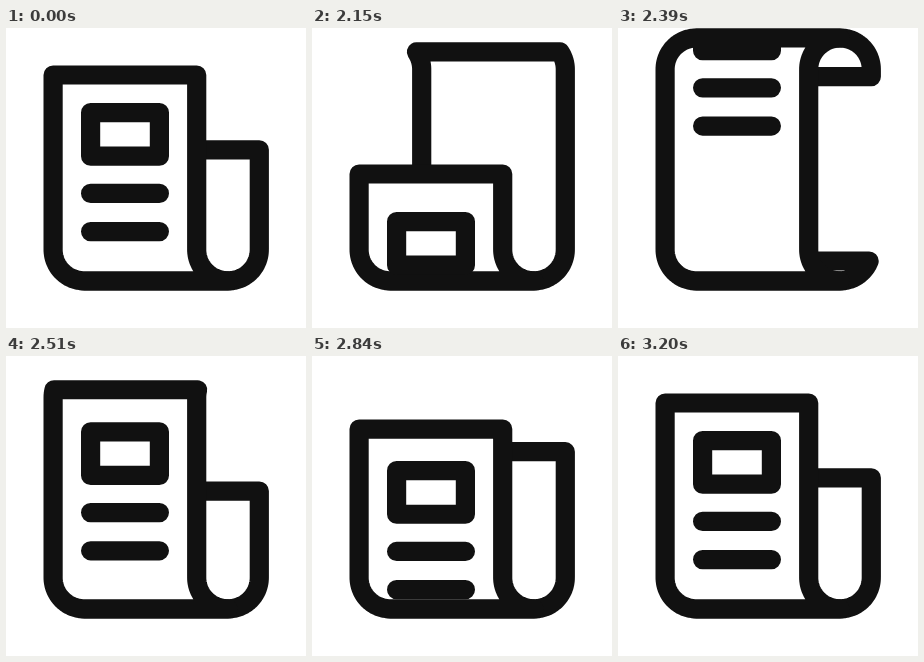
Write an HTML page with a canvas that moves like this. It is 300 px wide and 300 px high and loops after 3230 ms.

```html
<!DOCTYPE html>
<html lang="en">
<head>
<meta charset="utf-8">
<title>Rolling newspaper</title>
<style>
  html, body { margin: 0; width: 100%; height: 100%; overflow: hidden; background: #fff; }
  canvas { display: block; width: 300px; height: 300px; }
</style>
</head>
<body>
<canvas id="stage"></canvas>
<script>
const LOOP = 3230, START = 2030, STEP = 30;
const INK = '#111', PAPER = '#fff';

// The sheet is a strip running around an upright belt, seen slightly from the side.
const R = 31.3, TOP = 41.3, BOTTOM = 221.6, LEFT = 78.4, RIGHT = 222;
const ARC = R * Math.PI / 2, SIDE = BOTTOM - TOP;
const HALF = SIDE + 2 * ARC, BELT = 2 * HALF;
const TAIL = ARC + 47 - TOP;                          // resting upper edge of the front
const SHEET = HALF + ARC + BOTTOM - 121.8 - TAIL;     // sheet length

const canvas = document.getElementById('stage');
const ctx = canvas.getContext('2d');
const dpr = window.devicePixelRatio || 1;
canvas.width = canvas.height = 300 * dpr;
ctx.scale(dpr, dpr);
ctx.lineWidth = 19.2;
ctx.lineCap = ctx.lineJoin = 'round';
ctx.strokeStyle = INK;
ctx.fillStyle = PAPER;

// cubic-bezier(.31, 0, .41, 1)
function ease(x) {
  if (x <= 0) return 0;
  if (x >= 1) return 1;
  let lo = 0, hi = 1;
  for (let i = 0; i < 30; i++) {
    const u = (lo + hi) / 2, v = 1 - u;
    if (3 * u * v * v * .31 + 3 * u * u * v * .41 + u ** 3 < x) lo = u; else hi = u;
  }
  return lo * lo * (3 - 2 * lo);
}

// Run past one full turn, then settle back.
function travel(t, from, to, over) {
  return (BELT + over) * ease((t - from) / (to - from)) - over * ease((t - 2700) / 500);
}

// Belt position: 0 is the top, HALF the bottom, front side first.
function point(cx, s) {
  s = ((s % BELT) + BELT) % BELT;
  const back = s > HALF;
  const d = back ? BELT - s : s;
  let dx = R, y;
  if (d < ARC) {
    dx = R * Math.sin(d / R);
    y = TOP - R * Math.cos(d / R);
  } else if (d <= ARC + SIDE) {
    y = TOP + d - ARC;
  } else {
    const a = (d - ARC - SIDE) / R;
    dx = R * Math.cos(a);
    y = BOTTOM + R * Math.sin(a);
  }
  return [cx + (back ? dx : -dx), y];
}

function panel(a, b) {
  const path = new Path2D();
  const n = Math.max(1, Math.ceil((b - a) / 2));
  for (let i = 0; i <= n; i++) path.lineTo(...point(LEFT, a + (b - a) * i / n));
  for (let i = n; i >= 0; i--) path.lineTo(...point(RIGHT, a + (b - a) * i / n));
  path.closePath();
  return path;
}

function article(clip, dy) {
  ctx.save();
  ctx.clip(clip);
  ctx.translate(0, dy);
  ctx.strokeRect(84.6, 84.6, 68.8, 43.6);
  ctx.beginPath();
  for (const y of [165.4, 203.6]) {
    ctx.moveTo(84.6, y);
    ctx.lineTo(153.4, y);
  }
  ctx.stroke();
  ctx.restore();
}

function draw(t) {
  const run = TAIL + travel(t, 2003, 2700, 36.5);
  const turns = Math.floor(run / BELT);
  const tail = run - turns * BELT;
  const shift = travel(t, 1993, 2705, 42) - turns * BELT;

  ctx.clearRect(0, 0, 300, 300);
  for (const k of [1, 3, 0, 2]) {                     // back panels, then front panels
    const a = Math.max(tail, k * HALF);
    const b = Math.min(tail + SHEET, (k + 1) * HALF);
    if (b - a < .01) continue;
    // keep the ends just inside this side of the belt
    const path = panel(a + .001, b - .001);
    ctx.fill(path);
    ctx.stroke(path);
    if (k % 2 === 0) article(path, shift - k * HALF);
  }
}

function tick() {
  const t = performance.now() % LOOP;
  draw(t < START ? 0 : START + STEP * Math.floor((t - START) / STEP));
  requestAnimationFrame(tick);
}
tick();
</script>
</body>
</html>
```
